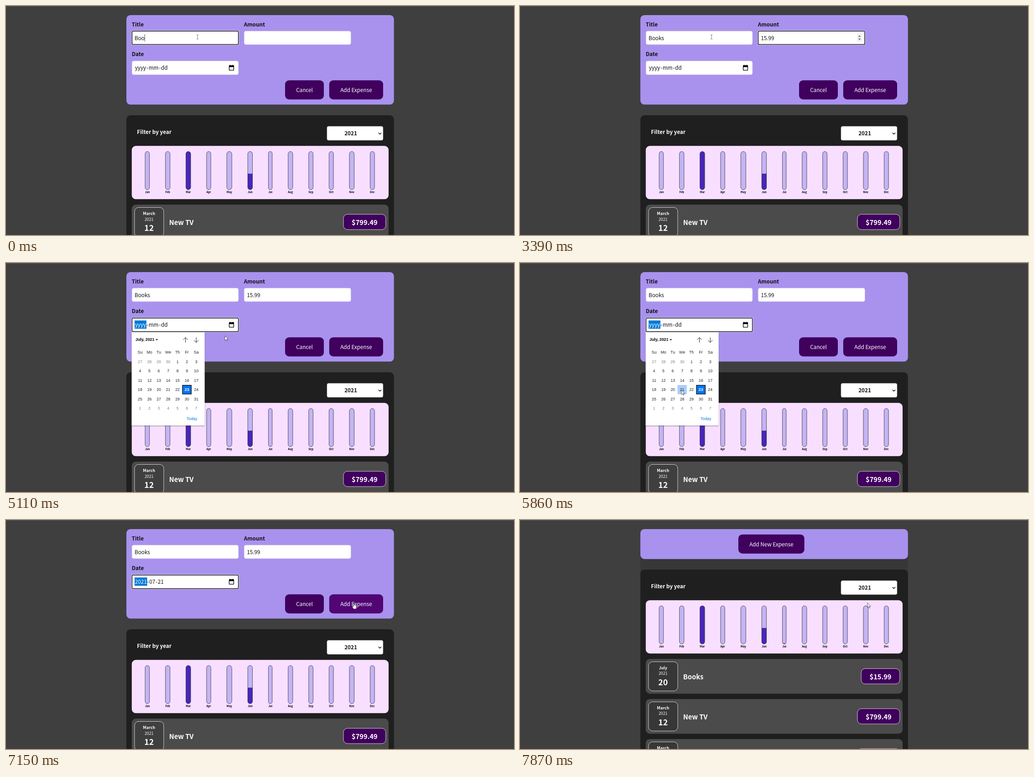
Write an HTML page that moves like this. It is 1114 by 503 pixels and loops after 8 s.

```html
<!DOCTYPE html>
<html lang="en">
<head>
<meta charset="utf-8">
<title>Expense form</title>
<style>
html, body { margin: 0; width: 100%; height: 100%; overflow: hidden; background: #3f3f3f; }
svg { display: block; width: 1114px; height: 503px; }
text { font-family: "Noto Sans CJK JP", "Noto Sans CJK SC", "Noto Sans CJK", "Noto Sans", sans-serif; white-space: pre; }
.ui { font-family: "Liberation Sans", Arial, sans-serif; }
</style>
</head>
<body>
<svg id="stage" viewBox="0 0 1114 503"></svg>
<script>
const stage = document.getElementById("stage");
const LOOP = 8000, REM = 11.733;
const PURPLE = "#40005d", INK = "#111";
const MONTHS = "Jan Feb Mar Apr May Jun Jul Aug Sep Oct Nov Dec".split(" ");
const BAR_W = [10.2, 10.8, 11, 10, 11.8, 11, 9, 10.8, 10.4, 10.4, 11.2, 10.4];

const pen = document.createElement("canvas").getContext("2d");
pen.font = REM + 'px "Noto Sans CJK JP", "Noto Sans CJK SC", "Noto Sans CJK", "Noto Sans", sans-serif';
const widthOf = s => pen.measureText(s).width;

const rect = (x, y, w, h, r, fill, extra = "") =>
  `<rect x="${x}" y="${y}" width="${w}" height="${h}" rx="${r}" fill="${fill}" ${extra}/>`;
const text = (s, x, y, { size = REM, fill = INK, bold, mid, ui } = {}) =>
  `<text x="${x}" y="${y}" font-size="${size}" fill="${fill}"${bold ? ' font-weight="700"' : ""}` +
  `${mid ? ' text-anchor="middle"' : ""}${ui ? ' class="ui"' : ""}>${s}</text>`;
const path = (d, fill, extra = "") => `<path d="${d}" fill="${fill}" ${extra}/>`;
const line = (d, color, w) => path(d, "none", `stroke="${color}" stroke-width="${w}"`);
const outline = (color, w) => `stroke="${color}" stroke-width="${w}"`;

// value of the last [time, value] step reached
const at = (steps, t) => steps.reduce((v, s) => (t >= s[0] ? s[1] : v), steps[0][1]);

const TITLE = [[0, "Boo"], [520, "Book"], [670, "Books"]];
const AMOUNT = [[0, ""], [2080, "1"], [2230, "15"], [2380, "15."], [2650, "15.9"], [2770, "15.99"]];
const FOCUS = [[0, "title"], [1220, "amount"], [3510, "date"]];
const CARET = [[0, true], [1650, false], [2080, true], [3390, false]];
const POINTER = [
  [0, [420, 68]], [3800, [422, 76]], [3930, [436, 100]], [4060, [462, 136]], [4190, [490, 166]],
  [4320, [506, 178]], [4450, [505, 160]], [4580, [498, 138]],
  [5030, [480, 160]], [5190, [445, 194]], [5360, [412, 224]], [5530, [386, 250]],
  [5690, [364, 270]], [5860, [354, 279]],
  [6590, [410, 270]], [6730, [520, 246]], [6870, [646, 214]], [7010, [738, 190]], [7150, [763, 184]],
  [7580, [762, 182]]
];
const OPEN = 4860, PICK = 6450, SUBMIT = 7580;

const inside = ([x, y], l, t, w, h) => x >= l && x < l + w && y >= t && y < t + h;

function field(x, y, w, h, focused) {
  if (!focused) return rect(x + .4, y + .4, w - .8, h - .8, 4, "#fff", outline("#d0c8e4", .75));
  return rect(x - .3, y - .3, w + .6, h + .6, 3, "#fff", outline("#fff", 1.2)) +
    rect(x + .6, y + .6, w - 1.2, h - 1.2, 2.2, "#fff", outline("#101010", 1.5));
}

const caret = x => rect(x, 62, .8, 16, 0, "#222");

function button(label, x, y, w, hover) {
  return rect(x, y, w, 42, 8.8, hover ? "#510674" : PURPLE) +
    text(label, x + w / 2, y + 25.8, { fill: "#fff", mid: true });
}

function dateField(t, focused) {
  const parts = t < PICK ? ["yyyy", "mm", "dd"] : ["2021", "07", "21"];
  let x = 282, out = field(275.8, 120.3, 234.4, 31, focused);
  parts.forEach((s, i) => {
    const w = widthOf(s) + 1.47, lit = focused && i === 0;
    if (lit) out += rect(x, 126.3, w, 18.2, 0, "#0078d7");
    out += text(s, x + .73, 140, { fill: lit ? "#fff" : INK });
    x += w;
    if (i < 2) {
      out += text("-", x, 140);
      x += widthOf("-");
    }
  });
  return out + rect(489.5, 131.2, 9.9, 10, .8, "none", outline("#000", 1.3)) +
    path("M489 130.6H500V134.2H489ZM490.7 129.2H492.2V131H490.7ZM496.8 129.2H498.3V131H496.8Z", "#000");
}

function form(t, p) {
  const focus = at(FOCUS, t), title = at(TITLE, t), amount = at(AMOUNT, t);
  const blink = at(CARET, t);
  let out = rect(264, 20, 586.7, 196.5, 8.8, "#a892ee") +
    text("Title", 275.7, 45.2, { bold: true }) +
    text("Amount", 521.8, 45.2, { bold: true }) +
    text("Date", 275.7, 110.2, { bold: true }) +
    field(275.8, 54.7, 234.4, 30.5, focus === "title") + text(title, 282, 74.5) +
    field(521.8, 54.7, 234.9, 30.5, focus === "amount") + text(amount, 528.3, 74.5);
  if (focus === "amount")
    out += rect(739, 61, 11, 17, 0, "#efefef") +
      path("M741.9 67.6L744.5 64.8 747.1 67.6ZM741.9 71.8L744.5 74.6 747.1 71.8Z", "#444");
  if (blink && focus === "title") out += caret(282 + widthOf(title));
  if (blink && focus === "amount") out += caret(528.3 + widthOf(amount));
  return out + dateField(t, focus === "date") +
    button("Cancel", 612, 163.2, 85, inside(p, 612, 163, 85, 42)) +
    button("Add Expense", 708.8, 163.2, 118.2, inside(p, 709, 163, 118, 42));
}

function bars(top, july) {
  const fills = { Mar: 1, Jun: .42, Jul: july };
  let x = 287.7 + 17.1, out = "";
  MONTHS.forEach((m, i) => {
    const w = BAR_W[i], r = w / 2, part = fills[m] || 0, y = top + 79.2, h = 84.4;
    out += `<clipPath id="bar${i}">${rect(x, y, w, h, r, "#000")}</clipPath>` +
      rect(x, y, w, h, r, "#c3b4f3") +
      (part ? rect(x, y + h * (1 - part), w, h * part, 0, "#4826b9", `clip-path="url(#bar${i})"`) : "") +
      rect(x + .35, y + .35, w - .7, h - .7, r - .35, "none", outline("#313131", .75)) +
      text(m, x + r, top + 170.9, { size: REM / 2, bold: true, mid: true, fill: "#000" });
    x += w + 34.25;
  });
  return out;
}

function item(y, month, day, name, price, priceW, boxFill) {
  const white = { fill: "#fff", bold: true }, mid = { ...white, mid: true };
  const px = 832.8 - priceW;
  return rect(275.8, y, 563.2, 76.2, 8.8, "#4b4b4b") +
    rect(281.9, y + 6.2, 64, 64, 8.8, boxFill, outline("#fff", .75)) +
    text(month, 313.7, y + 22.6, { ...mid, size: REM * .75 }) +
    text("2021", 313.7, y + 35.2, { fill: "#fff", mid: true, size: REM * .75 }) +
    text(day, 313.7, y + 57.6, { ...mid, size: REM * 1.5 }) +
    text(name, 357.8, y + 44.6, { ...white, size: REM * 1.25 }) +
    rect(px, y + 21.2, priceW, 33.6, 8.8, PURPLE, outline("#fff", .75)) +
    text(price, px + priceW / 2, y + 44.6, { ...mid, size: REM * 1.25 });
}

function expenses(top, t) {
  const sent = t >= SUBMIT, box = sent ? "#373737" : "#3f3f3f";
  const july = sent ? at([[SUBMIT, 0], [7720, .01], [7870, .02]], t) : 0;
  let y = top + 196.2;
  let out = rect(264, top, 586.7, 600, 8.8, "#1f1f1f") +
    text("Filter by year", 287.3, top + 41.2, { fill: "#fff", bold: true }) +
    rect(704, top + 24.2, 122.8, 30.6, 3.5, "#fff", outline("#ccc", .6)) +
    text("2021", 756, top + 44.2, { bold: true, mid: true }) +
    line(`M816.8 ${top + 38.4}l3.1 3.1 3.1 -3.1`, "#111", 1.4) +
    rect(275.8, top + 67.2, 563.2, 117, 8.8, "#f8dfff") + bars(top, july);
  if (sent) {
    out += item(y, "July", "20", "Books", "$15.99", 84.6, box);
    y += 88;
  }
  out += item(y, "March", "12", "New TV", "$799.49", 92.8, box);
  if (sent) out += item(y + 88, "March", "28", "Car Insurance", "$294.67", 92.8, box);
  return out;
}

function calendar(p) {
  const ui = { ui: true, size: 8.8, mid: true, fill: "#222" };
  let out = rect(275.6, 152, 160, 205, 0, "#fff", 'filter="url(#shade)"') +
    text("July, 2021", 284, 171.3, { ...ui, mid: false, bold: true, fill: "#000" }) +
    path("M328 167.2H333.2L330.6 170.2Z", "#111") +
    line("M393.6 175V163.8M388.6 168.8L393.6 163.8 398.6 168.8", "#222", 1) +
    line("M417.2 163.4V174.6M412.2 169.6L417.2 174.6 422.2 169.6", "#222", 1);
  "Su Mo Tu We Th Fr Sa".split(" ").forEach((d, i) => out += text(d, 294 + i * 20.53, 199.2, ui));
  for (let i = 0; i < 42; i++) {
    const x = 294 + i % 7 * 20.53, y = 216.6 + Math.floor(i / 7) * 20.52;
    const n = i - 3, now = n === 23, away = n < 1 || n > 31;
    const day = n < 1 ? n + 30 : n > 31 ? n - 31 : n;
    if (now) out += rect(x - 9.6, y - 9.6, 19.2, 19.2, 0, "#0075ff", outline("#111", 1.4));
    else if (inside(p, x - 10.2, y - 10.2, 20.4, 20.4)) out += rect(x - 10.2, y - 10.2, 20.4, 20.4, 1, "#abcdfb");
    out += text(day, x, y + 3.1, { ...ui, bold: now, fill: now ? "#fff" : away ? "#808080" : "#222" });
  }
  return out + text("Today", 407.6, 345.2, { ...ui, fill: "#0b78d4" });
}

function pointer(t, p) {
  const [x, y] = p, sent = t >= SUBMIT;
  let shape;
  if (!sent && inside(p, 276, 55, 234, 30))
    shape = line("M-2.2 -4.6H-.6L0 -4 .6 -4.6H2.2M0 -4V4M-2.2 4.6H-.6L0 4 .6 4.6H2.2", "#555", .8);
  else if (!sent && (inside(p, 709, 163, 118, 42) || inside(p, 612, 163, 85, 42)))
    shape = path("M-1.2 -.6Q0 -2 1 -.6V3.2Q2 2.6 2.8 3.6 3.8 3 4.4 4.1 5.6 3.7 5.8 5V8L4.8 11.2H-.8L-3.4 7.2Q-4 5.6 -2.4 5.8L-1.2 6.8Z",
      "#fff", outline("#222", .6));
  else
    shape = path("M0 0V10.2L2.4 8.1 4 11.7 5.6 11 4 7.5H7.1Z", "#fff", outline("#222", .7));
  return `<g transform="translate(${x} ${y})">${shape}</g>`;
}

const DEFS = '<defs><filter id="shade" x="-10%" y="-10%" width="120%" height="120%">' +
  '<feDropShadow dx="0" dy="1" stdDeviation="1.3" flood-color="#000" flood-opacity=".45"/></filter></defs>';

function scene(t) {
  const p = at(POINTER, t), sent = t >= SUBMIT;
  let out = DEFS + rect(0, 0, 1114, 503, 0, "#3f3f3f") + rect(0, 0, 1114, 1, 0, "#5a5a5a");
  if (sent)
    out += rect(264, 80, 586.7, 423, 0, "#373737") +
      rect(264, 20, 586.7, 65.7, 8.8, "#a892ee") +
      button("Add New Expense", 478.8, 31.7, 144.8, false) + expenses(109, t);
  else out += expenses(240.1, t) + form(t, p);
  if (t >= OPEN && t < PICK) out += calendar(p);
  return out + pointer(t, p);
}

let shown = "";
const start = performance.now();
function tick() {
  const next = scene((performance.now() - start) % LOOP);
  if (next !== shown) stage.innerHTML = shown = next;
  requestAnimationFrame(tick);
}
tick();
</script>
</body>
</html>
```
